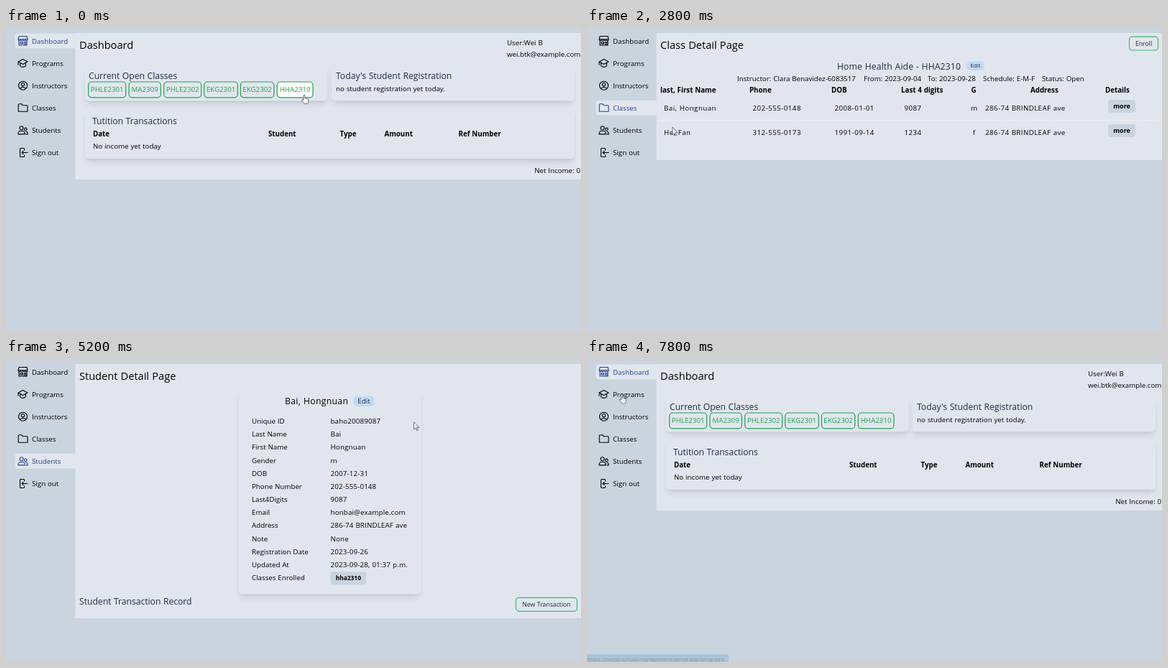
Animation, 800 px wide and 422 px high, one loop 8 s. Source, as an HTML page:

```html
<!DOCTYPE html>
<html lang="en">
<head>
<meta charset="utf-8">
<title>School dashboard</title>
<style>
  html, body { margin: 0; width: 100%; height: 100%; overflow: hidden; background: #cad4df; }
  svg { display: block; width: 100%; height: 100%; }
  text { font-family: 'Open Sans', 'Noto Sans', sans-serif; white-space: pre; word-spacing: .03em; }
</style>
</head>
<body>
<svg id="stage" viewBox="0 0 800 422"></svg>
<script>
const LOOP = 8000, STEP = 200;
const BG = '#cad4df', PANEL = '#e1e6ee', INK = '#000', NAVY = '#1f2c45', BLUE = '#27408f';
const GREEN = '#22a04c', LIME = '#3dba69', SKY = '#c0daf5';
const BASE = 9.75, HEAD = 12.15, TITLE = 14.6;

// y is the vertical middle of the capitals
function text(x, y, str, o = {}) {
  const { size = BASE, color = INK, weight = 400, anchor = 'start', gap = 0 } = o;
  return `<text x="${x}" y="${y + size * 0.36}" font-size="${size}" fill="${color}" font-weight="${weight}" text-anchor="${anchor}" letter-spacing="${gap}">${str}</text>`;
}
const bold = (x, y, str) => text(x, y, str, { weight: 700 });
const title = str => text(102, 24, str, { size: TITLE });
const heading = (x, y, str, gap = 0) => text(x, y, str, { size: HEAD, color: NAVY, gap });

function box(x, y, w, h, r, fill, extra = '') {
  return `<rect x="${x}" y="${y}" width="${w}" height="${h}" rx="${r}" fill="${fill}" ${extra}/>`;
}
function button(x, y, w, h, label, o = {}) {
  const { fill = 'none', stroke, r = 4, ...font } = o;
  const line = stroke ? `stroke="${stroke}" stroke-width="1.2"` : '';
  return box(x, y, w, h, r, fill, line) +
    text(x + w / 2, y + h / 2, label, { anchor: 'middle', ...font });
}
function card(x, y, w, h) {
  return box(x + 2, y + 8.5, w - 4, h - 4, 4, '#000', 'opacity=".1" filter="url(#wide)"') +
    box(x + 2.6, y + 5.2, w - 5.2, h - 5.2, 4, '#000', 'opacity=".1" filter="url(#near)"') +
    box(x, y, w, h, 5, PANEL);
}
const panel = bottom => box(96.5, 7, 704, bottom - 7, 0, PANEL);

const menu = [
  ['Dashboard', 'M2 1h11l1 4.2c0 2.3-3.2 2.3-3.2 0c0 2.3-3.3 2.3-3.3 0c0 2.3-3.3 2.3-3.3 0c0 2.3-3.2 2.3-3.2 0zM1 5.2h13M2 7.2v6.3h11V7.2M4 9h3.4v2.4H4zM9.5 13.5V9h2v4.5'],
  ['Programs', 'M7.5 2L1 5.4l6.5 3.4L14 5.4zM3.6 7v4c2 2.4 5.8 2.4 7.8 0V7M1 5.4v4.4'],
  ['Instructors', 'M1.5 7.5a6 6 0 1 1 12 0a6 6 0 1 1-12 0M5.3 6a2.2 2.2 0 1 1 4.4 0a2.2 2.2 0 1 1-4.4 0M3.6 12c1-3 6.8-3 7.8 0'],
  ['Classes', 'M1.2 12.5V3a1 1 0 0 1 1-1h3.6l1.6 2h5.6a1 1 0 0 1 1 1v7.5z'],
  ['Students', 'M3 4.3a2.5 2.5 0 1 1 5 0a2.5 2.5 0 1 1-5 0M1 13v-1.4a3 3 0 0 1 3-3h3a3 3 0 0 1 3 3V13zM9.5 6a1.8 1.8 0 1 1 3.6 0a1.8 1.8 0 1 1-3.6 0M11.6 9.4c2 0 2.6 1.3 2.6 3.6h-2.4'],
  ['Sign out', 'M9.5 4V2.5a1 1 0 0 0-1-1h-4a1 1 0 0 0-1 1v10a1 1 0 0 0 1 1h4a1 1 0 0 0 1-1V11M6 7.5h8M8 5.5l-2 2 2 2']
];
function sidebar(active) {
  return menu.map(([name, icon], i) => {
    const y = 18 + i * 31.1, on = name === active, color = on ? BLUE : INK;
    return (on ? box(12.5, y - 10.6, 90, 20.8, 4, PANEL) : '') +
      `<path d="${icon}" transform="translate(16 ${y - 7.5})" fill="none" stroke="${color}" stroke-width="1.1" stroke-linejoin="round" stroke-linecap="round"/>` +
      text(36, y, name, { color });
  }).join('');
}

function dashboard(hover) {
  const codes = [['PHLE2301', 114.7, 52], ['MA2309', 171, 44.3], ['PHLE2302', 219.7, 52],
    ['EKG2301', 275.7, 46.6], ['EKG2302', 326.4, 46.4], ['HHA2310', 377.2, 49.8]];
  const columns = [['Date', 121], ['Student', 365], ['Type', 464.5], ['Amount', 526.5], ['Ref Number', 629.5]];
  return panel(211) + sidebar('Dashboard') + title('Dashboard') +
    text(697, 20.5, 'User:Wei B') + text(697, 36.5, 'wei.btk@example.com') +
    card(110, 52, 337.5, 49.5) + card(453, 52, 338, 49.5) + card(110, 112, 681, 70) +
    heading(115, 67, 'Current Open Classes') +
    codes.map(([code, x, w]) => button(x, 75, w, 21.8, code, {
      stroke: GREEN, color: GREEN, r: 4.5, fill: code === hover ? '#fff' : 'none'
    })).join('') +
    heading(459, 67, "Today's Student Registration") +
    text(459, 84, 'no student registration yet today.') +
    heading(120, 130, 'Tutition Transactions') +
    columns.map(([name, x]) => bold(x, 147.3, name)).join('') +
    text(121, 164, 'No income yet today') +
    text(799, 198.3, 'Net Income: 0', { anchor: 'end' });
}

const STREET = '286-74 BRINDLEAF ave', PHONE = '202-555-0148';

function classPage() {
  const info = [['Instructor: Clara Benavidez-6083517', 209], ['From: 2023-09-04', 385],
    ['To: 2023-09-28', 474], ['Schedule: E-M-F', 551], ['Status: Open', 633]];
  const columns = [['last, First Name', 102], ['Phone', 226], ['DOB', 340], ['Last 4 digits', 437],
    ['G', 534.5], ['Address', 617], ['Details', 721]];
  const rows = [['Bai, Hongnuan', PHONE, '2008-01-01', '9087', 'm'],
    ['He, Fan', '312-555-0173', '1991-09-14', '1234', 'f']];
  const left = [107, 230.5, 344.5, 441.5];
  return panel(184) + sidebar('Classes') + title('Class Detail Page') +
    button(754.5, 12.2, 40, 18.8, 'Enroll', { stroke: LIME, color: NAVY, size: 8.7, weight: 500 }) +
    heading(348, 53.3, 'Home Health Aide - HHA2310', 0.15) +
    button(528, 46.3, 25, 12.6, 'Edit', { fill: SKY, color: NAVY, r: 5.5, size: 8, weight: 500 }) +
    info.map(([str, x]) => text(x, 70, str)).join('') +
    columns.map(([name, x]) => bold(x, 86.3, name)).join('') +
    box(100, 128.4, 696, 0.8, 0, '#eef2f6') +
    rows.map((row, i) => {
      const y = 111.7 + i * 34;
      return row.slice(0, 4).map((str, k) => text(left[k], y, str, { gap: 0.45 })).join('') +
        text(538.5, y, row[4], { anchor: 'middle' }) + text(554, y, STREET, { gap: 0.4 }) +
        button(725, y - 11.7, 38.2, 18, 'more', { fill: BG, size: 9, weight: 700 });
    }).join('');
}

function studentPage() {
  const fields = [['Unique ID', 'baho20089087'], ['Last Name', 'Bai'], ['First Name', 'Hongnuan'],
    ['Gender', 'm'], ['DOB', '2007-12-31'], ['Phone Number', PHONE], ['Last4Digits', '9087'],
    ['Email', 'honbai@example.com'], ['Address', STREET], ['Note', 'None'],
    ['Registration Date', '2023-09-26'], ['Updated At', '2023-09-28, 01:37 p.m.'], ['Classes Enrolled', '']];
  return panel(361) + sidebar('Students') + title('Student Detail Page') +
    card(323.5, 44, 254, 283.5) +
    text(388, 58.5, 'Bai, Hongnuan', { size: HEAD, gap: 0.35 }) +
    button(484, 52, 28, 13.8, 'Edit', { fill: SKY, color: NAVY }) +
    fields.map(([label, value], i) => {
      const y = 86.6 + i * 18.17;
      return text(342, y, label) + text(451.5, y, value, { gap: 0.15 });
    }).join('') +
    button(451.5, 296.2, 49.7, 18.4, 'hha2310', { fill: BG, size: 8.4, weight: 700 }) +
    heading(102, 337.5, 'Student Transaction Record') +
    button(709.5, 332.3, 85, 19, 'New Transaction', { stroke: LIME, color: NAVY, size: 8.7, weight: 500 });
}

const ARROW = 'M0 0V10.5L2.6 8.2L4.2 12L5.8 11.3L4.2 7.7H7.3Z';
const HAND = 'M-1 1a1 1 0 0 1 2 0V5q1-.5 1.7.4q1-.4 1.6.5q1.6-.2 1.6 1.2V9q0 3.6-3 3.6H1.3q-1.6 0-2.8-2.2L-3.4 7.6q-.1-1.5 1.2-1L-1 7.6Z';

// time, x, y, hand pointer from here on
const moves = [
  [0, 415, 93, 1], [1200, 406, 88, 1], [2000, 398, 82, 0], [2200, 398, 82, 0], [2800, 119, 138, 0],
  [3600, 744, 110, 1], [4000, 745, 111, 0], [4800, 745, 111, 0], [6000, 60.5, 21, 0],
  [6200, 61.5, 49.5, 1], [7200, 57, 49.5, 1], [7800, 48.5, 49.5, 1]
];
const SITE = 'nextjs-school-management.vercel.app';
// from, until, width, address
const hints = [
  [1400, 2400, 265, SITE + '/classes/65123688c9fda1eb002843ce'],
  [3600, 4400, 265, SITE + '/students/65137a5ad03a959cdb469...'],
  [5800, 6200, 161, 'https://' + SITE],
  [6200, 8000, 197, 'https://' + SITE + '/programs']
];

function cursor(t) {
  const i = moves.findLastIndex(m => m[0] <= t);
  const a = moves[i], b = moves[i + 1] || a;
  const u = b === a ? 0 : (t - a[0]) / (b[0] - a[0]), k = u * u * (3 - 2 * u);
  const x = a[1] + (b[1] - a[1]) * k, y = a[2] + (b[2] - a[2]) * k;
  return `<path d="${a[3] ? HAND : ARROW}" transform="translate(${x} ${y})" fill="#fafbfc" stroke="#4c5058" stroke-width=".8" stroke-linejoin="round"/>`;
}
function statusBar(t) {
  const hint = hints.find(h => t >= h[0] && t < h[1]);
  if (!hint) return '';
  return `<g opacity="${t >= 7800 ? 0.38 : 1}">` + box(-4, 411.3, hint[2] + 4, 16, 2, '#74acd3') +
    text(0.3, 418.6, hint[3], { size: 7.37, color: '#1d2e43' }) + '</g>';
}
function page(t) {
  if (t < 2200) return dashboard('HHA2310');
  if (t < 4000) return classPage();
  return t < 6200 ? studentPage() : dashboard();
}

const blur = (id, d) => `<filter id="${id}" x="-20%" y="-60%" width="140%" height="220%"><feGaussianBlur stdDeviation="${d}"/></filter>`;
const defs = `<defs>${blur('wide', 4.9)}${blur('near', 1.95)}</defs>`;
const stage = document.getElementById('stage');
let shown = -1;

function draw(now) {
  const t = Math.floor((now % LOOP) / STEP) * STEP;
  if (t !== shown) {
    shown = t;
    stage.innerHTML = defs + box(0, 0, 800, 422, 0, BG) + page(t) + statusBar(t) + cursor(t);
  }
}
const start = performance.now();
function tick() {
  draw(performance.now() - start);
  requestAnimationFrame(tick);
}
tick();
</script>
</body>
</html>
```
